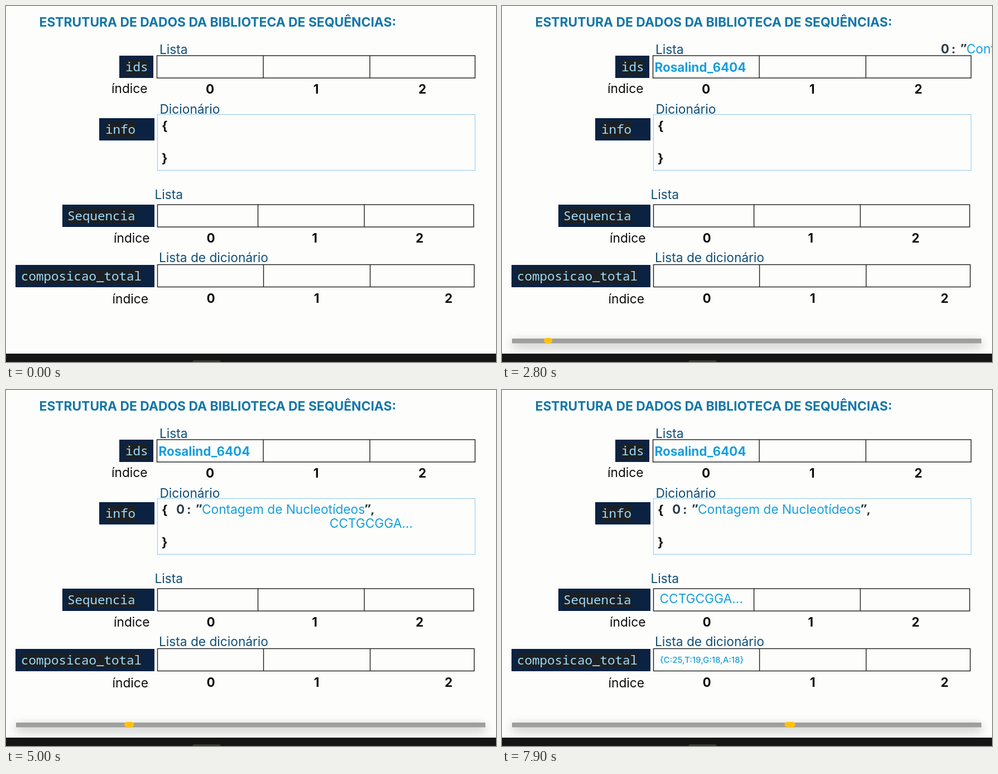
An HTML page with a canvas for the animation above (8 s loop, 878 by 638 pixels).

```html
<!DOCTYPE html>
<html lang="pt">
<head>
<meta charset="utf-8">
<title>Estrutura de dados</title>
<style>
html, body { margin: 0; width: 878px; height: 638px; overflow: hidden; background: #fdfdfc; }
canvas { display: block; }
</style>
</head>
<body>
<canvas id="stage" width="878" height="638"></canvas>
<script>
const ctx = document.getElementById('stage').getContext('2d');
const LOOP = 8000, STEP = 100;
const SANS = 'Inter, "Open Sans", sans-serif';
const MONO = '"Noto Sans Mono", "DejaVu Sans Mono", monospace';
const REGULAR = `22.7px ${SANS}`;
const BOLD = `bold 22.4px ${SANS}`;
const QUOTE = 'bold 23px "Open Sans", sans-serif';
const SKY = '#179fdb', LABEL = '#114f74', SLATE = '#2c3f4a', INK = '#0c0c0c';

function text(str, x, y, font, color, align = 'left') {
  ctx.font = font;
  ctx.fillStyle = color;
  ctx.textAlign = align;
  ctx.fillText(str, x, y);
}

function rect(x, y, w, h, color) {
  ctx.fillStyle = color;
  ctx.fillRect(x, y, w, h);
}

function tag(name, x, y, w, h, textX) {
  rect(x, y, w, h, '#0b2241');
  rect(textX, y + 7, name.length * 13.5, 27, '#1c2024');
  text(name, textX, y + 28, `22.5px ${MONO}`, '#9cdcfe');
}

function cells(x, y, right, bottom, dividers) {
  ctx.strokeStyle = '#1c1c1c';
  ctx.lineWidth = 1.4;
  ctx.strokeRect(x, y, right - x, bottom - y);
  ctx.beginPath();
  for (const d of dividers) {
    ctx.moveTo(d, y);
    ctx.lineTo(d, bottom);
  }
  ctx.stroke();
}

function indices(labelX, labelY, centers, y) {
  text('índice', labelX, labelY, REGULAR, INK);
  centers.forEach((c, i) => text(String(i), c, y, BOLD, INK, 'center'));
}

function slide() {
  rect(0, 0, 878, 638, '#fdfdfc');
  text('ESTRUTURA DE DADOS DA BIBLIOTECA DE SEQUÊNCIAS:', 59.5, 37, `bold 22.85px ${SANS}`, '#1277a8');

  text('Lista', 275, 85.5, REGULAR, LABEL);
  tag('ids', 203, 89, 61, 40, 214);
  cells(270.5, 89, 840.5, 129, [461, 652]);
  indices(189, 156, [365.5, 555.5, 746], 157);

  text('Dicionário', 275.5, 193, REGULAR, LABEL);
  tag('info', 167, 201, 99, 40, 178);
  ctx.strokeStyle = '#9fd0f0';
  ctx.lineWidth = 1.2;
  ctx.strokeRect(271.5, 194.5, 569, 100);
  text('{', 279, 223, BOLD, INK);
  text('}', 279, 281, BOLD, INK);

  text('Lista', 266.5, 345.5, REGULAR, LABEL);
  tag('Sequencia', 101, 356, 165, 40, 110);
  cells(271.5, 356, 838, 396, [451.5, 642]);
  indices(193, 424, [367, 553, 741], 424);

  text('Lista de dicionário', 274, 459, REGULAR, LABEL);
  tag('composicao_total', 17, 464, 249, 40, 27);
  cells(271.5, 463.5, 839, 503.5, [461.5, 652.5]);
  indices(190.5, 533, [367, 556.5, 793], 532);
}

// Eased flight ending at (x, y); slope gives the rise per pixel still to go.
function flight(t, f) {
  const u = Math.min(1, Math.max(0, (t - f.start) / f.time));
  const left = f.dist * (1 + Math.cos(Math.PI * u)) / 2;
  const dip = f.dip * Math.min(1, left / f.settle);
  return [f.x + left, f.y - f.slope * left + dip];
}

const ID = { x: 273.5, y: 118, start: 50, time: 1350, dist: 606, slope: 0.128, dip: 5.8, settle: 30 };
const INFO = { x: 305, y: 222, start: 2352, time: 1350, dist: 640, slope: 0.294, dip: 4.6, settle: 9 };
const SEQ = { x: 282.5, y: 382, start: 4284, time: 1200, dist: 848, slope: 0.4545, dip: 0, settle: 1 };

function infoText(x, y) {
  const name = 'Contagem de Nucleotídeos';
  text('0', x, y, BOLD, SLATE);
  text(':', x + 19, y, BOLD, SLATE);
  text('”', x + 36, y, QUOTE, SLATE);
  text(name, x + 46, y, REGULAR, SKY);
  text('”,', x + 46 + ctx.measureText(name).width, y, QUOTE, SLATE);
}

// The marker speeds up steadily, then holds its pace.
function progress(t) {
  const s = (t - 50) / 1000, ramp = Math.min(s, 6.906);
  const speed = 16.3 * ramp;
  const x = 21 + 8.15 * ramp * ramp + speed * (s - ramp);
  const w = 12.5 + speed * 0.06;
  ctx.save();
  ctx.shadowColor = 'rgba(0,0,0,0.32)';
  ctx.shadowBlur = 18;
  ctx.shadowOffsetY = 6;
  rect(18, 596, 841, 8.5, '#9f9f9f');
  ctx.restore();
  ctx.fillStyle = '#ffc20a';
  ctx.beginPath();
  ctx.roundRect(x - w / 2, 595, w, 9, 4.5);
  ctx.fill();
}

function draw(t) {
  slide();
  if (t > 50) {
    progress(t);
    text('Rosalind_6404', ...flight(t, ID), BOLD, SKY);
  }
  if (t > INFO.start) infoText(...flight(t, INFO));
  if (t > SEQ.start) text('CCTGCGGA...', ...flight(t, SEQ), REGULAR, SKY);
  ctx.globalAlpha = Math.min(1, Math.max(0, (t - 7300) / 400));
  text('{C:25,T:19,G:18,A:18}', 283, 489, `500 15px ${SANS}`, SKY);
  ctx.globalAlpha = 1;
  rect(0, 623, 878, 15, '#151515');
  ctx.fillStyle = '#3b3a31';
  ctx.beginPath();
  ctx.roundRect(334, 635, 51, 8, 4);
  ctx.fill();
}

function tick(now) {
  draw(Math.floor((now % LOOP) / STEP) * STEP);
  requestAnimationFrame(tick);
}
requestAnimationFrame(tick);
</script>
</body>
</html>
```
